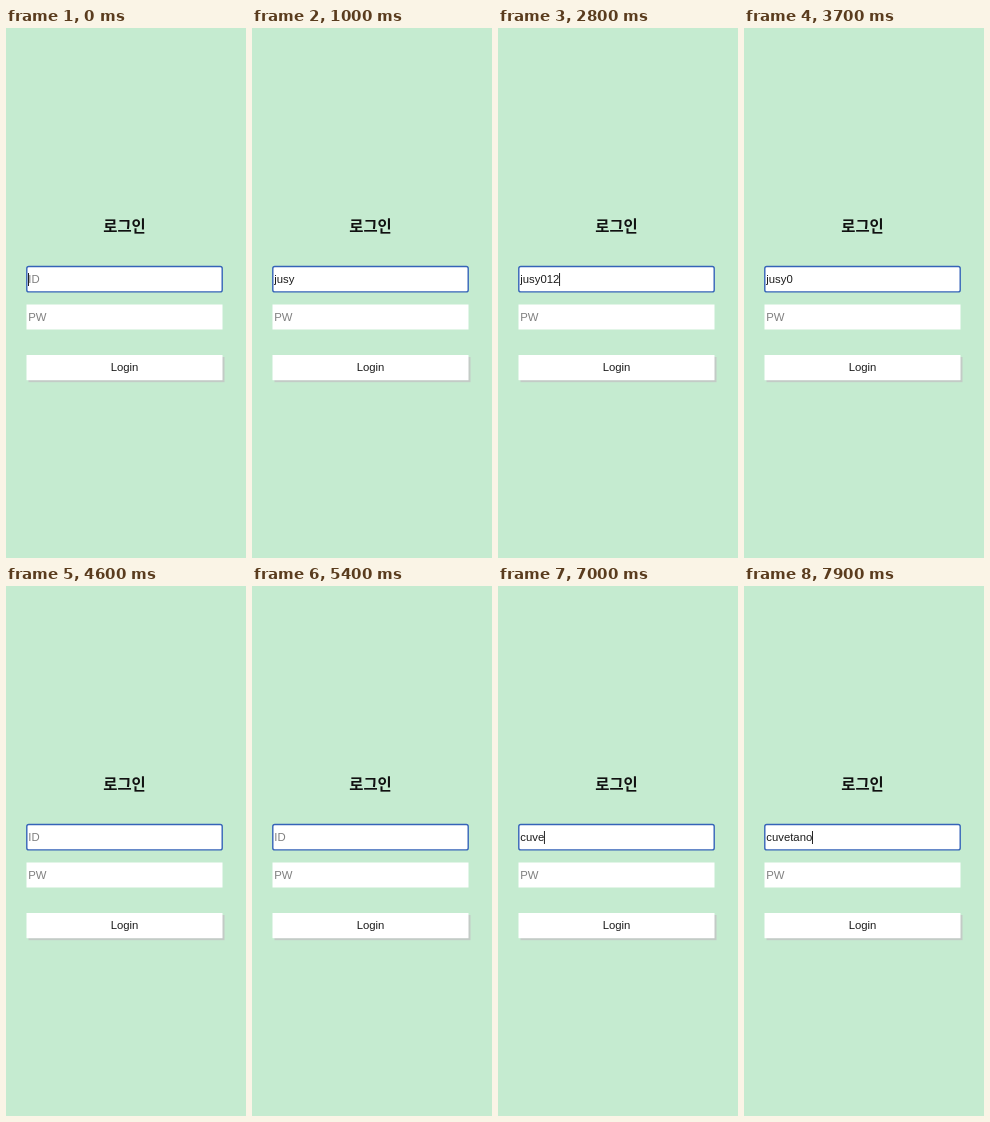
An HTML page that plays this animation: 240 by 530 pixels, repeating every 8000 ms.

```html
<!DOCTYPE html>
<html lang="ko">
<head>
<meta charset="utf-8">
<title>로그인</title>
<style>
  html, body { margin: 0; width: 100%; height: 100%; overflow: hidden; background: #c5ebd0; }
  svg { display: block; width: 100vw; height: 100vh; }
  text { font: 11.33px "Liberation Sans", Arial, sans-serif; fill: #1c1c1c; }
  h1, .title { font: bold 15.4px "Noto Sans CJK KR", "Noto Sans CJK", sans-serif; fill: #111; }
  .mid { text-anchor: middle; }
  .hint { fill: #808080; }
  .box { fill: #fff; }
  .focus { stroke: #3563b8; stroke-width: 1.4; }
</style>
</head>
<body>
<svg viewBox="0 0 240 530">
  <text class="title mid" x="118.5" y="204">로그인</text>
  <rect class="box focus" x="20.8" y="238.5" width="195.4" height="25.4" rx="2"/>
  <text id="entry" x="22.3" y="255"></text>
  <rect id="caret" y="245" width="1" height="13" fill="#222"/>
  <rect class="box" x="20.5" y="276.5" width="196" height="25"/>
  <text class="hint" x="22.3" y="293">PW</text>
  <rect x="22.5" y="329" width="196" height="25.2" fill="#c3cbc6"/>
  <rect class="box" x="20.5" y="327" width="196" height="25.2"/>
  <text class="mid" x="118.5" y="343.3">Login</text>
</svg>
<script>
const LOOP = 8000, BLINK = 500;
const first = "jusy0123", second = "cuvetano";
const entry = document.getElementById("entry");
const caret = document.getElementById("caret");

// [time, word, letters shown]
const edits = [
  [0, first, 0], [100, first, 1], [200, first, 2], [400, first, 3], [500, first, 4],
  [2600, first, 5], [2700, first, 6], [2800, first, 7], [2900, first, 8],
  [3500, first, 6], [3700, first, 5], [4000, first, 4], [4100, first, 3],
  [4300, first, 2], [4500, first, 1], [4600, first, 0],
  [6100, second, 1], [6200, second, 2], [6900, second, 3], [7000, second, 4],
  [7300, second, 5], [7500, second, 7], [7800, second, 8]
];

function stateAt(t) {
  let text = "", typedAt = 0;
  for (const [time, word, count] of edits) {
    if (time > t) break;
    // Typing restarts the blink, deleting does not
    if (count > text.length) typedAt = time;
    text = word.slice(0, count);
  }
  return { text, caretOn: Math.floor((t - typedAt) / BLINK) % 2 === 0 };
}

function draw(t) {
  const { text, caretOn } = stateAt(t);
  entry.textContent = text || "ID";
  entry.setAttribute("class", text ? "" : "hint");
  const width = text ? entry.getComputedTextLength() : 0;
  caret.setAttribute("x", 22 + width);
  caret.setAttribute("visibility", caretOn ? "visible" : "hidden");
}

const start = performance.now();
function tick() {
  draw((performance.now() - start) % LOOP);
  requestAnimationFrame(tick);
}
tick();
</script>
</body>
</html>
```
